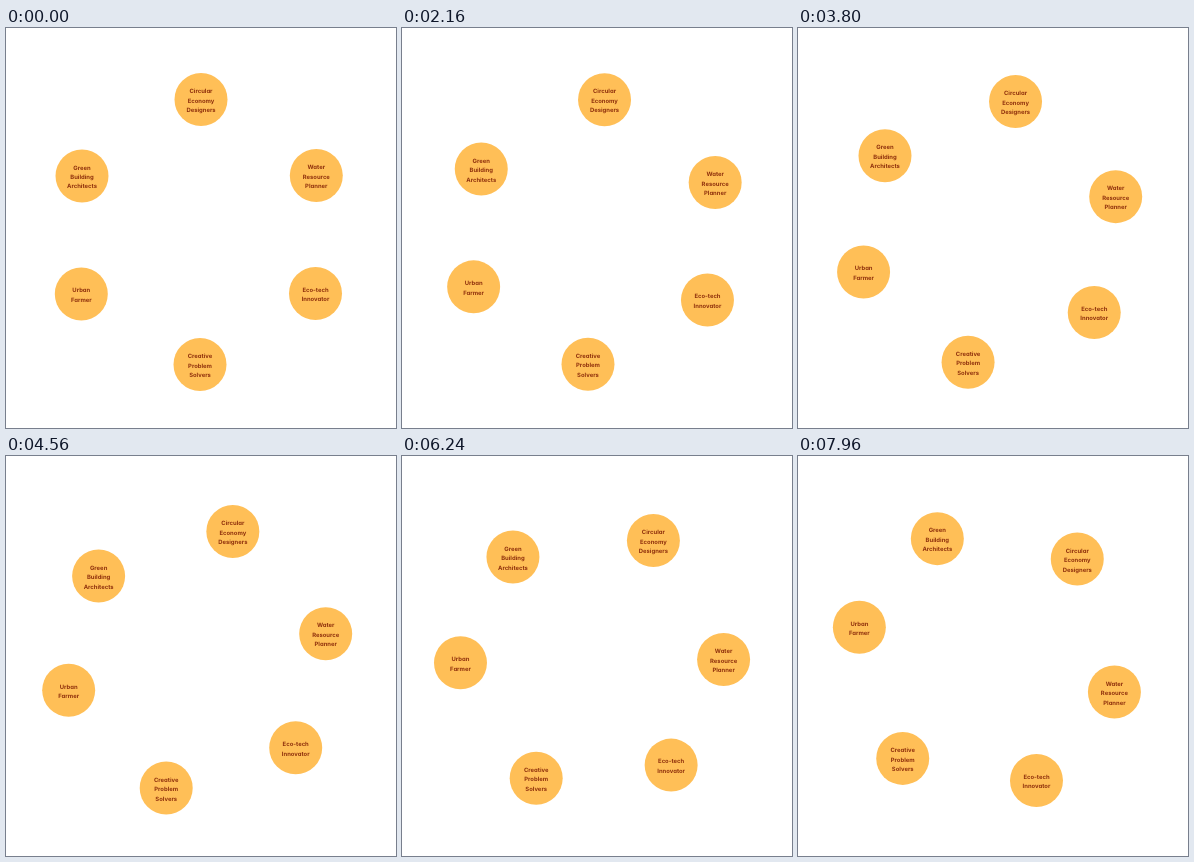
These frames come from a looping animation (390x400 px, 8000 ms). An HTML page:

```html
<!DOCTYPE html>
<html lang="en">
<head>
<meta charset="utf-8">
<style>
html, body { margin: 0; width: 100%; height: 100%; overflow: hidden; background: #fff; }
svg { display: block; width: 390px; height: 400px; }
circle { fill: #ffbf57; }
text {
  fill: #8f300c;
  font: 700 5.9px Inter, "Open Sans", sans-serif;
  font-feature-settings: "cv11";
  text-anchor: middle;
  text-rendering: geometricPrecision;
}
</style>
</head>
<body>
<svg id="stage" viewBox="0 0 390 400"></svg>
<script>
const LOOP = 8000, CX = 195, CY = 200, RADIUS = 26.5, LINE = 9.5;

// Resting offsets from the centre of the ring
const roles = [
  [0, -128.5, 'Circular', 'Economy', 'Designers'],
  [115.3, -52.4, 'Water', 'Resource', 'Planner'],
  [114.5, 65.5, 'Eco-tech', 'Innovator'],
  [-1, 136.5, 'Creative', 'Problem', 'Solvers'],
  [-119.7, 66, 'Urban', 'Farmer'],
  [-119, -52.1, 'Green', 'Building', 'Architects']
];

const stage = document.getElementById('stage');

function add(parent, tag, attrs = {}, label = '') {
  const el = document.createElementNS('http://www.w3.org/2000/svg', tag);
  for (const key in attrs) el.setAttribute(key, attrs[key]);
  el.textContent = label;
  return parent.appendChild(el);
}

const bubbles = roles.map(([x, y, ...lines]) => {
  const group = add(stage, 'g');
  add(group, 'circle', { r: RADIUS });
  lines.forEach((line, i) =>
    add(group, 'text', { y: 3.1 + (i - (lines.length - 1) / 2) * LINE }, line));
  return { x, y, group };
});

// Slow ease-in of the turn, in degrees after s seconds
const turn = s => s * s * (0.7474 - 0.01266 * s);

function draw(ms) {
  const a = turn(ms / 1000) * Math.PI / 180;
  const cos = Math.cos(a), sin = Math.sin(a);
  for (const { x, y, group } of bubbles) {
    const px = CX + x * cos - y * sin;
    const py = CY + x * sin + y * cos;
    group.setAttribute('transform', `translate(${px} ${py})`);
  }
}

function frame() {
  draw(performance.now() % LOOP);
  requestAnimationFrame(frame);
}
frame();
</script>
</body>
</html>
```
